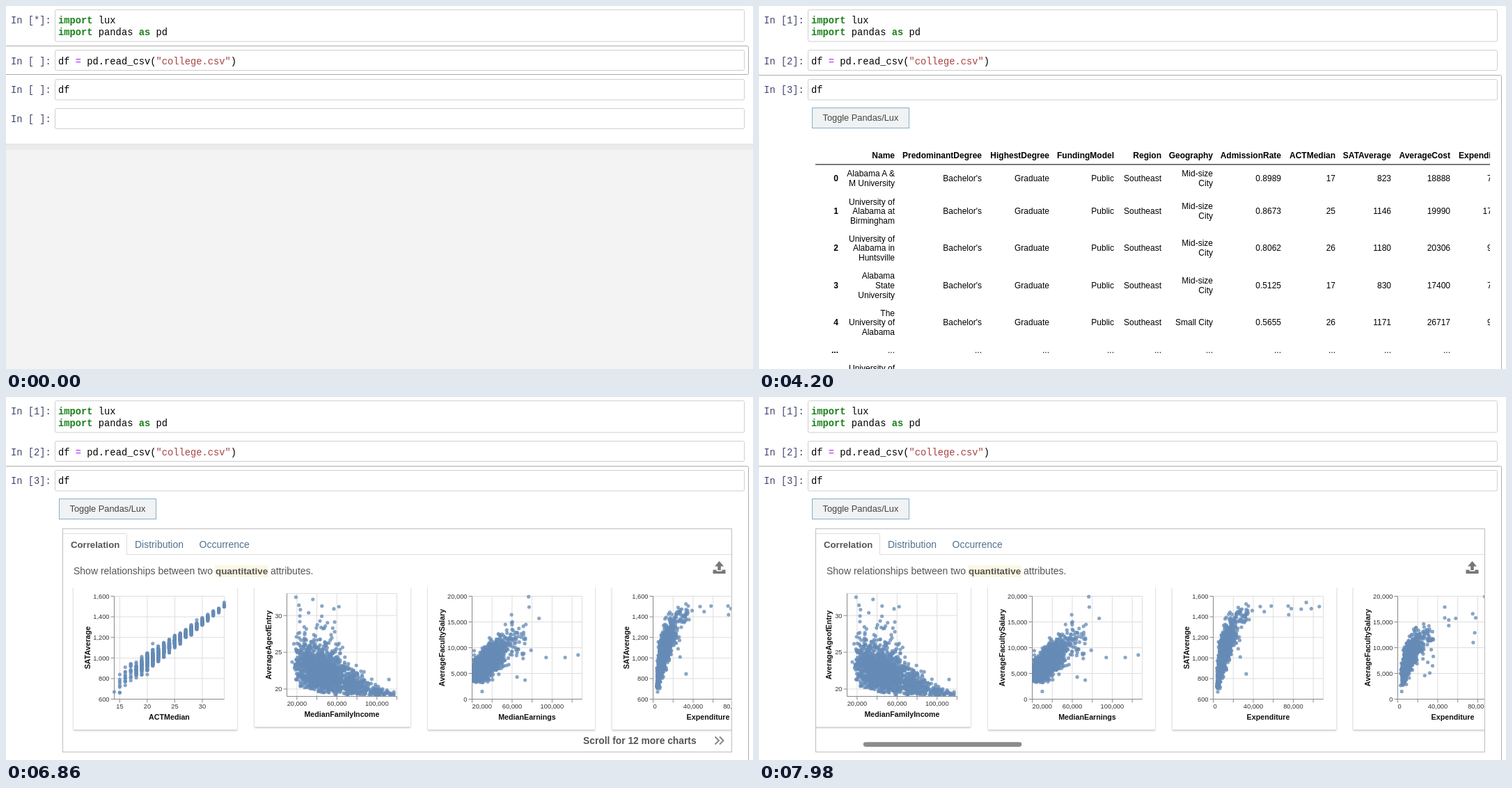
An HTML page that plays this animation: 1073x522 px, repeating every 8000 ms.

```html
<!DOCTYPE html>
<html lang="en">
<head>
<meta charset="utf-8">
<title>Notebook</title>
<style>
  html, body { margin: 0; width: 100%; height: 100%; overflow: hidden; background: #fff; }
  svg { display: block; width: 1073px; height: 522px; }
  text { font-family: "Liberation Sans", Arial, sans-serif; white-space: pre; }
  .code text { font: 13.78px "Liberation Mono", monospace; }
  .code .prompt { fill: #41456f; }
  .kw { fill: #1a801a; font-weight: bold; }
  .op { fill: #a2f; }
  .str { fill: #a84343; }
  .box { fill: #fff; stroke: #cfcfcf; }
  .sel { fill: none; stroke: #ababab; }
  .table text { font-size: 12px; text-anchor: end; }
  .bold { font-weight: bold; }
  .ui text { font-size: 14px; fill: #555; }
  .ui .link { fill: #53718f; }
  .card { fill: #fff; filter: drop-shadow(0 1px 1.3px rgba(0,0,0,.32)); }
  .grid { stroke: #ddd; fill: none; }
  .axis { stroke: #888; fill: none; }
  .ui .lab { font-size: 9.3px; fill: #333; }
  .ui .ttl { font-size: 10.7px; font-weight: bold; fill: #111; text-anchor: middle; }
  .dots { fill: #668bb6; fill-opacity: .77; }
</style>
</head>
<body>
<svg id="stage" viewBox="0 0 1073 522" xmlns="http://www.w3.org/2000/svg"></svg>
<script>
const LOOP = 8000, STEP = 70;
const T = { run2: 140, done1: 280, done2: 350, run3: 560, table: 1960, press: 3990, lux: 4340, scroll: 7700 };

const text = (x, y, s, attrs = '') => `<text x="${x}" y="${y}" ${attrs}>${s}</text>`;
const rect = (x, y, w, h, attrs = '') => `<rect x="${x}" y="${y}" width="${w}" height="${h}" ${attrs}/>`;
const path = (d, attrs = '') => `<path d="${d}" ${attrs}/>`;
const during = (from, to, body) => `<g data-from="${from}" data-to="${to}">${body}</g>`;
const span = (cls, s) => `<tspan class="${cls}">${s}</tspan>`;

// Seeded random numbers
let seed = 7;
const rnd = () => (seed = (seed * 16807) % 2147483647) / 2147483647;
const gauss = () => Math.sqrt(-2 * Math.log(rnd())) * Math.cos(2 * Math.PI * rnd());
const clamp = (v, lo, hi) => Math.max(lo, Math.min(hi, v));
const many = (n, make) => Array.from({ length: n }, make);

// Notebook cells
const prompt = (y, s) => text(7, y, `In [${s}]:`, 'class="prompt"');
const box = (y, h) => rect(70.5, y, 990, h, 'class="box" rx="2"');
const select = (y, h) => rect(-3.5, y, 1070, h, 'class="sel" rx="2"');

function cells() {
  const kw = s => span('kw', s);
  return '<g class="code">' +
    box(5.5, 45.5) + text(75, 25, kw('import') + ' lux') +
    text(75, 42, kw('import') + ' pandas ' + kw('as') + ' pd') +
    box(63.5, 29) + text(75, 83.5, `df ${span('op', '=')} pd.read_csv(${span('str', '"college.csv"')})`) +
    box(105.5, 29.5) + text(75, 125, 'df') +
    during(0, T.done1, prompt(25, '*')) + during(T.done1, LOOP, prompt(25, 1)) +
    during(0, T.run2, prompt(83.5, ' ')) + during(T.run2, T.done2, prompt(83.5, '*')) +
    during(T.done2, LOOP, prompt(83.5, 2)) +
    during(0, T.run3, prompt(125, ' ')) + during(T.run3, T.table, prompt(125, '*')) +
    during(T.table, LOOP, prompt(125, 3)) +
    during(0, T.table, box(147.5, 29) + prompt(166.5, ' ') +
      rect(0, 198, 1073, 324, 'fill="#f3f3f3"') + rect(0, 198, 1073, 9, 'fill="#ebebeb"') +
      rect(0, 198, 1073, 1, 'fill="#e0e0e0"')) +
    during(0, T.run2, select(57.5, 41)) +
    during(T.run2, T.run3, select(99.5, 41)) +
    during(T.run3, T.table, select(141.5, 41)) +
    during(T.press, LOOP, select(99.5, 500)) + '</g>';
}

// Data frame
function table() {
  const right = [195, 320, 417, 510, 578, 652, 750, 828, 908, 993];
  const heads = 'Name PredominantDegree HighestDegree FundingModel Region Geography AdmissionRate ACTMedian SATAverage AverageCost'.split(' ');
  const rows = [
    [248, 'Alabama A &amp;|M University', 'Mid-size|City', '0.8989', 17, 823, 18888, '7459'],
    [295, 'University of|Alabama at|Birmingham', 'Mid-size|City', '0.8673', 25, 1146, 19990, '17208'],
    [348, 'University of|Alabama in|Huntsville', 'Mid-size|City', '0.8062', 26, 1180, 20306, '9352'],
    [401.5, 'Alabama|State|University', 'Mid-size|City', '0.5125', 17, 830, 17400, '7393'],
    [455, 'The|University of|Alabama', 'Small City', '0.5655', 26, 1171, 26717, '9817']
  ];
  const cell = (x, mid, value) => {
    const lines = String(value).split('|');
    return lines.map((s, i) => text(x, mid + 4.3 + (i - (lines.length - 1) / 2) * 13.8, s)).join('');
  };
  let out = heads.map((s, i) => text(right[i], 219, s, 'class="bold"')).join('') +
    text(1005, 219, 'Expenditure', 'class="bold" style="text-anchor:start"') +
    rect(81, 227.3, 969, 1.2, 'fill="#222"');
  rows.forEach(([mid, name, place, ...nums], i) => {
    const spend = nums.pop();
    const values = [name, "Bachelor's", 'Graduate', 'Public', 'Southeast', place, ...nums];
    out += text(114, mid + 4.3, i, 'class="bold"') +
      values.map((v, c) => cell(right[c], mid, v)).join('') +
      text(spend.length > 4 ? 1039.5 : 1046, mid + 4.3, spend, 'style="text-anchor:start"');
  });
  out += text(114, 499, '...', 'class="bold"') + right.map(x => text(x, 499, '...')).join('') +
    text(195, 524.5, 'University of');
  return `<g class="table" clip-path="url(#tableClip)">${out}</g>`;
}

// Scatter charts
const W = 158, H = 148;
function chart({ x, top, card, xs, ys, titles, titleX, dots }) {
  const [x0, x1, xFirst, xStep, every, unit] = xs, [y0, y1, yFirst, yStep] = ys;
  const px = v => x + (v - x0) / (x1 - x0) * W;
  const py = v => top + H - (v - y0) / (y1 - y0) * H;
  const base = top + H, num = v => v.toLocaleString('en-US');
  let grid = `M${x} ${top}h${W}v${H}h${-W}z`, axis = `M${x} ${top}v${H}h${W}`, labels = '';
  for (let v = yFirst; v <= y1; v += yStep) {
    grid += `M${x} ${py(v)}h${W}`;
    axis += `M${x} ${py(v)}h-5`;
    labels += text(x - 7, py(v) + 3.3, num(v), 'class="lab" text-anchor="end"');
  }
  for (let v = xFirst, i = 0; v <= x1; v += xStep, i++) {
    grid += `M${px(v)} ${top}v${H}`;
    axis += `M${px(v)} ${base}v5`;
    if (i % every == 0)
      labels += text(px(v), base + 13.8, num(v * unit), `class="lab" text-anchor="${v == x0 ? 'start' : 'middle'}"`);
  }
  const mid = top + H / 2;
  return rect(card[0], 268, card[1], card[2] - 268, 'class="card" rx="1"') +
    path(grid, 'class="grid"') + path(axis, 'class="axis"') + labels +
    text(x + W / 2, base + 29.3, titles[0], 'class="ttl"') +
    text(titleX, mid, titles[1], `class="ttl" transform="rotate(-90 ${titleX} ${mid})" dy="3.8"`) +
    '<g class="dots">' + dots.map(([a, b]) =>
      `<circle cx="${px(a).toFixed(1)}" cy="${py(b).toFixed(1)}" r="2.6"/>`).join('') + '</g>';
}

function actDots() {
  const dot = (mean, sd) => () => {
    const act = clamp(Math.round(mean + sd * gauss()), 15, 34);
    return [act, 770 + 38.7 * (act - 15) + (48 - 2 * (act - 15)) * clamp(gauss(), -2.2, 2.2)];
  };
  return [...many(720, dot(22.5, 3)), ...many(170, dot(29, 2.6)),
    [14, 670], [15, 840], [15, 730], [20, 840], [21, 1140], [29, 1370], [34, 1540]];
}

function ageDots() {
  const dots = many(1500, () => {
    const inc = Math.exp(3.88 + .42 * gauss());
    const sd = clamp(1.75 - (inc - 40) * .02, .2, 1.6);
    let age = 23.3 - (inc - 20) * .045 + sd * gauss();
    if (inc < 65 && rnd() < .2) age -= 2.4 * Math.log(rnd());
    const floor = 19.2 + Math.max(0, 55 - inc) * .035;
    return [inc, age < floor ? floor + rnd() * 1.2 * sd : age];
  });
  return [...dots.filter(([i, a]) => i > 15 && i < 117 && a < 31),
    [19, 32.5], [22, 31.4], [36, 32.2], [45, 31.3], [62, 31.2], [57, 30.9], [112, 21.3], [117, 19.6]];
}

function earnDots() {
  const dots = many(1150, () => {
    const e = 22 + 33 * Math.pow(clamp(.42 + .25 * gauss(), 0, 1.6), 1.05);
    return [e, 7300 + (e - 37) * 170 + 1500 * gauss()];
  });
  const wide = many(60, () => { const e = 52 + 22 * rnd(); return [e, 11600 + (e - 60) * 90 + 2300 * gauss()]; });
  return [...dots.filter(d => d[1] > 3200), ...wide,
    [76.5, 19900], [77, 17900], [87, 15700], [94, 8100], [113, 8100], [126, 8600],
    [65, 4300], [73, 3700], [30, 1500], [71, 7900], [79, 9500]];
}

const spend = () => Math.exp(2.3 + .42 * gauss());
function satDots() {
  const dots = many(1000, () => { const e = spend(); return [e, 1050 + 300 * Math.log(e / 10) + 95 * gauss()]; });
  const wide = many(40, () => { const e = 20 + 16 * rnd(); return [e, 1385 + (e - 25) * 5 + 45 * gauss()]; });
  return [...dots.filter(([e, s]) => e > 2.5 && e < 29 && s > 700 && s < 1500), ...wide,
    [4.5, 670], [33, 845], [27, 1010], [25, 1090], [33, 1430], [39, 1460], [47, 1500], [51, 1450], [58, 1505],
    [75, 1505], [75.5, 1420], [78, 1480], [88, 1475], [93, 1540], [98, 1480], [106, 1500]];
}

function salaryDots() {
  const dots = many(1000, () => { const e = spend(); return [e, 7700 + 3900 * Math.log(e / 10) + 1450 * gauss()]; });
  const wide = many(40, () => { const e = 18 + 18 * rnd(); return [e, 11500 + 1500 * gauss()]; });
  return [...dots.filter(([e, s]) => e > 2.5 && e < 33 && s > 2600 && s < 15000), ...wide,
    [4, 1500], [27, 4600], [32, 5100], [47, 17900], [47, 15800], [51, 15400], [51, 14300], [58, 15700],
    [75, 16600], [78, 15800], [77, 12900], [75.5, 11000], [87, 19900]];
}

function charts() {
  const sat = [600, 1600, 600, 200], pay = [0, 20000, 0, 5000], cost = [0, 110, 0, 20, 2, 1000];
  return [
    { x: 155.5, top: 286.5, card: [97, 235, 478.5], xs: [14, 34, 15, 5, 1, 1], ys: sat,
      titles: ['ACTMedian', 'SATAverage'], titleX: 117, dots: actDots() },
    { x: 403.5, top: 282.5, card: [357, 224, 474.5], xs: [10, 120, 20, 20, 2, 1000], ys: [19, 33, 20, 5],
      titles: ['MedianFamilyIncome', 'AverageAgeofEntry'], titleX: 377.5, dots: ageDots() },
    { x: 669.5, top: 286.5, card: [606, 240, 478.5], xs: [20, 130, 20, 20, 2, 1000], ys: pay,
      titles: ['MedianEarnings', 'AverageFacultySalary'], titleX: 626, dots: earnDots() },
    { x: 929.5, top: 286.5, card: [870.5, 236, 478.5], xs: cost, ys: sat,
      titles: ['Expenditure', 'SATAverage'], titleX: 891, dots: satDots() },
    { x: 1194.5, top: 286.5, card: [1130.5, 240, 478.5], xs: cost, ys: pay,
      titles: ['Expenditure', 'AverageFacultySalary'], titleX: 1151, dots: salaryDots() }
  ].map(chart).join('');
}

// Chart panel
function panel() {
  return rect(81.5, 189.5, 961, 321, 'fill="#fff" stroke="#bdbdbd"') +
    path('M82 196.5H171.5Q173.5 196.5 173.5 198.5V226.5H1042', 'fill="none" stroke="#ddd"') +
    text(93, 216.7, 'Correlation', 'class="bold" style="font-size:13.2px"') +
    text(185, 216.7, 'Distribution', 'class="link"') + text(277.5, 216.7, 'Occurrence', 'class="link"') +
    rect(300, 242, 77, 17, 'fill="#fcf8e3"') +
    text(97, 255, 'Show relationships between two ') +
    text(301, 255, 'quantitative', 'class="bold" style="font-size:13.4px"') +
    text(380, 255, 'attributes.') +
    path('M1024.5 236L1031 243.500H1026.800V249H1022.200V243.500H1018Z', 'fill="#777"') +
    path('M1015.500 248.500H1020.500V250.500H1028.500V248.500H1033.500V254H1015.500Z', 'fill="#777"') +
    '<g clip-path="url(#stripClip)"><g id="strip">' + charts() + '<g id="hint">' +
    text(829, 499, 'Scroll for 12 more charts', 'class="bold" style="font-size:13.8px"') +
    path('M1018.500 488.500L1024 494L1018.500 499.500M1025 488.500L1030.500 494L1025 499.500', 'fill="none" stroke="#888" stroke-width="2"') +
    '</g></g>' + rect(0, 496.3, 227.5, 6.6, 'id="thumb" rx="3.3" fill="#8c8c8c"') + '</g>';
}

function button() {
  return during(T.table, T.press, rect(77, 147, 138, 28, 'fill="#f1f1f1"')) +
    during(T.press, LOOP, rect(76.5, 146.500, 139, 29, 'fill="#f0f2f3" stroke="#86aecb"')) +
    during(T.table, LOOP, text(91.500, 165.200, 'Toggle Pandas/Lux', 'style="font-size:12.8px;fill:#444"'));
}

const stage = document.getElementById('stage');
stage.innerHTML = '<defs><clipPath id="tableClip">' + rect(77, 200, 973, 322) +
  '</clipPath><clipPath id="stripClip">' + rect(82, 274, 960, 236) + '</clipPath></defs>' +
  cells() + during(T.table, T.lux, table()) +
  '<g class="ui">' + button() + during(T.lux, LOOP, panel()) + '</g>';

const timed = [...stage.querySelectorAll('[data-from]')];
const [strip, hint, thumb] = ['strip', 'hint', 'thumb'].map(id => document.getElementById(id));

function scrollAt(t) {
  if (t < T.scroll) return 0;
  return 1 + 276 * Math.pow(Math.min(1, (t - T.scroll) / 280), 1.4);
}

function draw(now) {
  const t = Math.floor(now % LOOP / STEP) * STEP;
  for (const el of timed)
    el.style.display = t >= +el.dataset.from && t < +el.dataset.to ? '' : 'none';
  const offset = Math.round(scrollAt(t)), moving = offset > 1;
  strip.setAttribute('transform', `translate(${-offset} 0)`);
  hint.style.display = moving ? 'none' : '';
  thumb.style.display = moving ? '' : 'none';
  thumb.setAttribute('x', 84.5 + offset * .236);
}

const start = performance.now();
function tick() {
  draw(performance.now() - start);
  requestAnimationFrame(tick);
}
tick();
</script>
</body>
</html>
```
